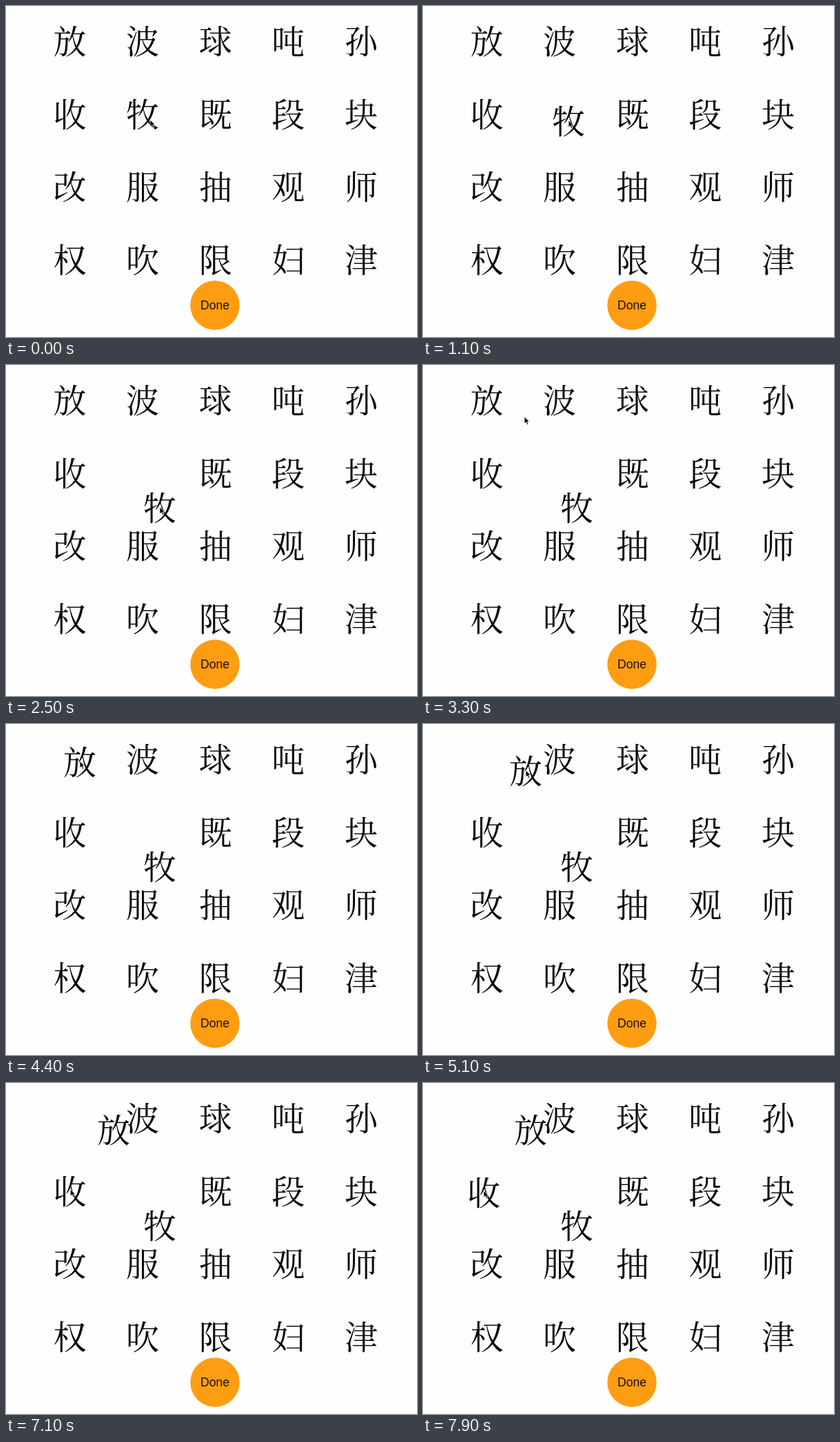
An HTML page that plays this animation: 596x480 px, repeating every 8 s.

```html
<!DOCTYPE html>
<html lang="zh-CN">
<head>
<meta charset="utf-8">
<title>Character sorting</title>
<style>
  html, body { margin: 0; width: 100%; height: 100%; overflow: hidden; background: #fefefe; }
  svg { display: block; width: 596px; height: 480px; }
  #grid text {
    font: 300 48px "Noto Serif CJK SC", "Noto Serif SC", "Songti SC", "Noto Sans CJK SC", "Noto Sans CJK", serif;
    text-anchor: middle;
  }
  #label { font: 17.5px "Liberation Sans", Arial, sans-serif; text-anchor: middle; fill: #1a0f00; }
</style>
</head>
<body>
<svg viewBox="0 0 596 480">
  <circle cx="303" cy="434" r="35.7" fill="#ff9d12"/>
  <text id="label" x="303" y="440">Done</text>
  <g id="grid" fill="#080808"></g>
  <path id="cursor" d="M0 0V10L2.4 7.9L4.2 11.8L5.9 11L4.2 7.2H7.3Z" fill="#000" stroke="#fff" stroke-width=".8"/>
</svg>
<script>
const LOOP = 8000, STEP = 100;
const rows = ['放波球吨孙', '收牧既段块', '改服抽观师', '权吹限妇津'];
const grid = document.getElementById('grid');
const cursor = document.getElementById('cursor');
const glyphs = {};

const place = (el, [x, y]) => el.setAttribute('transform', `translate(${x} ${y})`);

rows.forEach((row, r) => [...row].forEach((char, c) => {
  const el = document.createElementNS('http://www.w3.org/2000/svg', 'text');
  el.textContent = char;
  el.setAttribute('y', 18);
  const home = [92.5 + c * 105.6, 51 + r * 105.6];
  place(el, home);
  grid.append(el);
  glyphs[char] = { el, home };
}));

// Pointer stops: time, x, y
const path = [
  [0, 209, 165], [1000, 210, 165], [1100, 211, 166], [1900, 228, 203],
  [2200, 223, 206], [2500, 223, 206], [3300, 147, 75], [3900, 95, 50],
  [4200, 95, 50], [5100, 149, 67], [5400, 156, 67], [5700, 156, 67],
  [6400, 109, 141], [7200, 91, 156], [7500, 91, 156], [7900, 88, 156]
];

// A dragged glyph is centred on the pointer from grab to drop.
const drags = [
  { char: '牧', grab: 1000, drop: 2200, dx: 0, dy: 1 },
  { char: '放', grab: 4200, drop: 5400, dx: 0, dy: 1 },
  { char: '收', grab: 7500, drop: LOOP, dx: 0, dy: 3 }
];

function pointerAt(t) {
  const i = path.findIndex(p => p[0] > t);
  if (i < 0) return path[path.length - 1].slice(1);
  const [t0, x0, y0] = path[i - 1], [t1, x1, y1] = path[i];
  const k = (t - t0) / (t1 - t0);
  return [x0 + (x1 - x0) * k, y0 + (y1 - y0) * k];
}

function draw(t) {
  place(cursor, pointerAt(t));
  for (const { char, grab, drop, dx, dy } of drags) {
    const { el, home } = glyphs[char];
    const [x, y] = pointerAt(Math.min(t, drop));
    place(el, t < grab ? home : [x + dx, y + dy]);
  }
}

const start = performance.now();
function tick() {
  const t = (performance.now() - start) % LOOP;
  draw(Math.floor(t / STEP) * STEP);
  requestAnimationFrame(tick);
}
tick();
</script>
</body>
</html>
```
